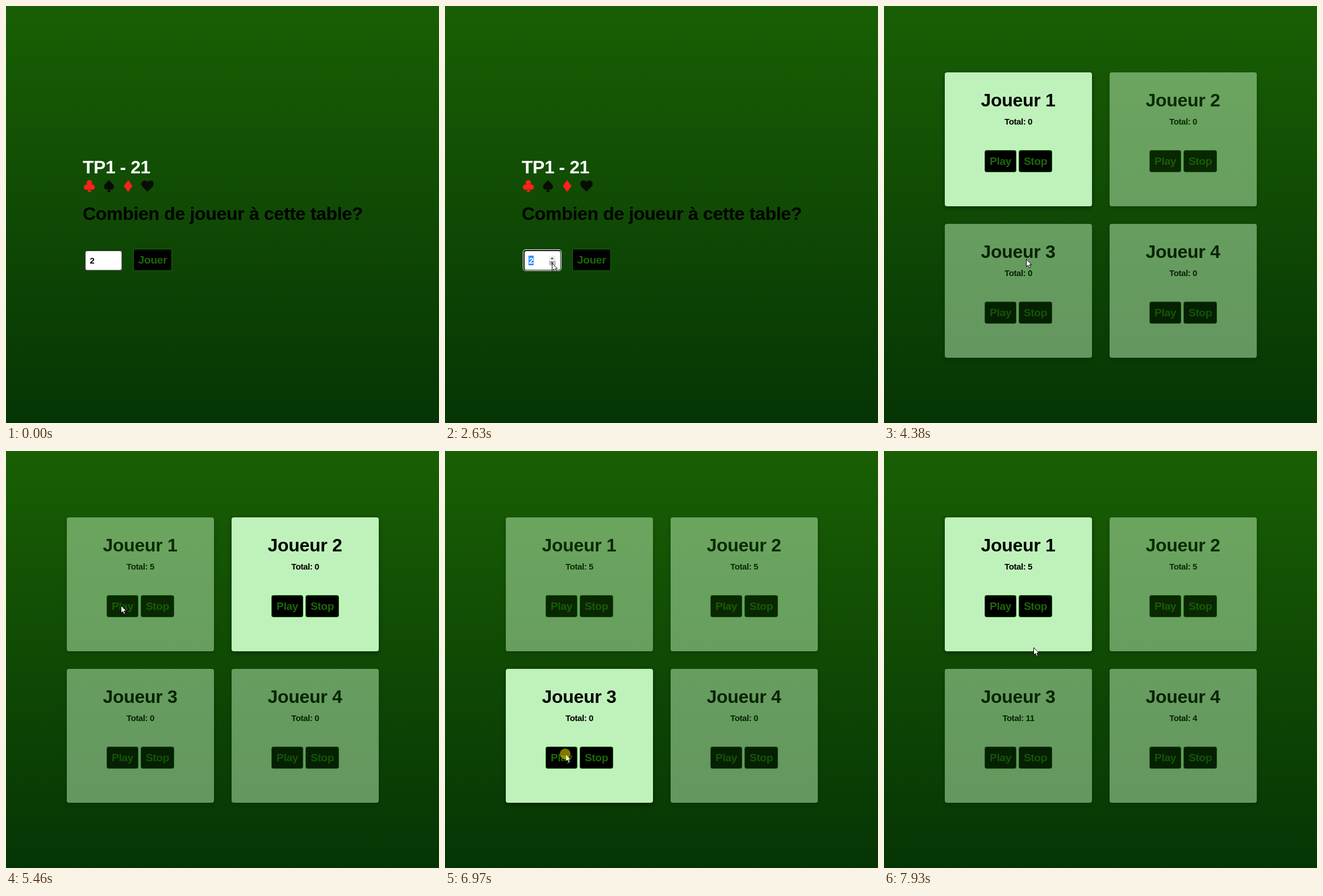
Write an HTML page with a canvas that moves like this. It is 762x735 px and loops after 8 s.

```html
<!DOCTYPE html>
<html lang="fr">
<head>
<meta charset="utf-8">
<title>21</title>
<style>
html, body { margin: 0; width: 100%; height: 100%; overflow: hidden; background: #0f4a04; }
canvas { display: block; }
</style>
</head>
<body>
<canvas id="stage" width="762" height="735"></canvas>
<script>
const W = 762, H = 735, LOOP = 8000, PRESS = 70;
const ctx = document.getElementById('stage').getContext('2d');
const FONT = '"Liberation Sans", Arial, sans-serif';
const HEART = 'M0 10L-9 1C-15 -6 -6 -14 0 -7C6 -14 15 -6 9 1Z';
const STEM = 'M-1 2H1Q1 8 3.600 10.500H-3.600Q-1 8 -1 2Z';
const ARROW = 'M0 0V13L3 10.300L5 15L7.300 14L5.300 9.500H9.300Z';
const HAND = 'M-1.500 1Q0 -1 1.500 1V6L8 7.500V13L6 18H-2L-6 10Q-5 7.500 -1.500 11Z';

const felt = ctx.createLinearGradient(0, 0, 0, H);
felt.addColorStop(0, '#195f04');
felt.addColorStop(1, '#063505');

// The pointer's errands: where it rests, from when, and when it clicks there.
const visit = (x, y, rest, ...clicks) => ({ x, y, rest, clicks });
const entry = visit(476, 640, 100);
const lower = visit(188, 453, 1220, 1490, 1890, 2430);
const raise = visit(188, 442, 2900, 3250, 3640);
const start = visit(250, 446, 4130, 4180);
const plays = [
  visit(201, 272, 5180, 5220),
  visit(495, 281, 6040, 6080),
  visit(212, 534, 6970, 6970),
  visit(480, 529, 7340, 7390)
];
const VISITS = [entry, visit(194, 452, 610), lower, raise, start, ...plays, visit(263, 346, 7930)];
const CLICKS = VISITS.flatMap(v => v.clicks);
const SCORES = [5, 5, 11, 4];
const tableAt = start.clicks[0] + PRESS;

const pressed = t => CLICKS.some(c => t >= c && t < c + PRESS);
const turns = t => plays.filter(p => t >= p.clicks[0] + PRESS).length;
const cardX = i => 107 + 290 * (i % 2);
const cardY = i => 117 + 267 * Math.floor(i / 2);

function pointer(t) {
  let i = VISITS.findIndex(v => v.rest > t);
  if (i < 1) i = i < 0 ? VISITS.length - 1 : 1;
  const a = VISITS[i - 1], b = VISITS[i];
  const travel = 250 + 1.2 * Math.hypot(b.x - a.x, b.y - a.y);
  const go = Math.max((a.clicks.at(-1) ?? a.rest) + 100, b.rest - travel);
  const u = Math.min(1, Math.max(0, (t - go) / (b.rest - go)));
  const e = u * u * (3 - 2 * u);
  return {
    x: Math.round(a.x + (b.x - a.x) * e),
    y: Math.round(a.y + (b.y - a.y) * e),
    settled: u === 0 && t - a.rest > 30
  };
}

function box(x, y, w, h, r, fill) {
  ctx.beginPath();
  ctx.roundRect(x, y, w, h, r);
  ctx.fillStyle = fill;
  ctx.fill();
}

function disc(x, y, r, fill) {
  ctx.beginPath();
  ctx.arc(x, y, r, 0, Math.PI * 2);
  ctx.fillStyle = fill;
  ctx.fill();
}

function shape(d, x, y, fill, stroke, sx = 1, sy = 1) {
  const p = new Path2D(d);
  ctx.save();
  ctx.translate(x, y);
  ctx.scale(sx, sy);
  ctx.fillStyle = fill;
  ctx.fill(p);
  if (stroke) {
    ctx.strokeStyle = stroke;
    ctx.lineJoin = 'round';
    ctx.stroke(p);
  }
  ctx.restore();
}

function text(str, x, y, size, color, align = 'left', spacing = -0.01 * size) {
  ctx.font = `bold ${size}px ${FONT}`;
  ctx.letterSpacing = spacing + 'px';
  ctx.textAlign = align;
  ctx.fillStyle = color;
  ctx.fillText(str, x, y);
}

function button(label, x, y, w) {
  box(x, y, w, 39, 4, '#17640a');
  box(x + 1, y + 1, w - 2, 37, 3, '#000');
  text(label, x + w / 2, y + 26, 19.2, '#1b690a', 'center', -0.35);
}

function suits() {
  const red = '#fb221c', black = '#080d05', y = 317.3;
  for (let k = 0; k < 3; k++) {
    const a = (k * 2 / 3 - 0.5) * Math.PI;
    disc(146.7 + 5.7 * Math.cos(a), y - 0.5 + 5.2 * Math.sin(a), 4.8, red);
  }
  disc(146.7, y, 3, red);
  shape(STEM, 146.7, y, red);
  shape(HEART, 181.2, y - 2, black, null, 0.8, -0.85);
  shape(STEM, 181.2, y, black);
  shape('M0 -10.500L7.600 0L0 10.500L-7.600 0Z', 215, y, red);
  shape(HEART, 249, y, black);
}

function spinner(t, y) {
  const hover = y < 449 ? 0 : t >= lower.rest - 200 ? 1 : -1;
  for (let half = 0; half < 2; half++) {
    const lit = pressed(t) ? '#999' : '#c4c4c4';
    box(183, 440 + 9 * half, 12, 9 - half, 0, half === hover ? lit : '#f0f0f0');
    shape('M-3 1.500L0 -1.500L3 1.500Z', 188.5, 444.5 + 8.5 * half, '#444', null, 1, 1 - 2 * half);
  }
}

function field(t, y) {
  const focus = t >= lower.clicks[0], selected = focus && t < raise.clicks[0];
  if (focus) {
    box(137, 429, 68, 38, 5, '#fff');
    box(138, 430, 66, 36, 4, '#101010');
  } else {
    box(139, 431, 65, 35, 3, '#777');
    box(139, 431, 64, 34, 3, '#26331f');
  }
  box(140, 432, 63, 33, 3, '#fff');
  if (selected) box(147, 440, 9, 17, 0, '#3390ff');
  const value = 2 + raise.clicks.filter(c => t >= c).length;
  text(value, 147.5, 454, 15, selected ? '#fff' : '#000', 'left', 0);
  if (focus && !selected) box(155, 440, 1, 16, 0, '#000');
  if (t >= 560 && t < start.rest - 150) spinner(t, y);
}

function welcome(t, y) {
  text('TP1 - 21', 135, 295, 32, '#fff', 'left', -0.5);
  suits();
  text('Combien de joueur à cette table?', 135, 377, 32, '#000');
  field(t, y);
  button('Jouer', 224, 428, 68);
}

function card(i, active, score) {
  const x = cardX(i), y = cardY(i), w = 259, h = 236, mid = x + w / 2;
  ctx.save();
  ctx.shadowColor = 'rgba(0,0,0,.4)';
  ctx.shadowBlur = 10;
  ctx.shadowOffsetY = 3;
  box(x, y, w, h, 4, '#bff2ba');
  ctx.restore();
  text('Joueur ' + (i + 1), mid - 0.5, y + 60, 32, '#000', 'center');
  text('Total: ' + score, mid, y + 92, 15, '#000', 'center', -0.4);
  button('Play', x + 70, y + 137, 56);
  button('Stop', x + 130, y + 137, 59);
  if (!active) {
    // letting the felt through at half strength fades the whole card
    ctx.globalAlpha = 0.5;
    box(x - 15, y - 15, w + 30, h + 30, 0, felt);
    ctx.globalAlpha = 1;
  }
}

function table(t) {
  const played = turns(t);
  SCORES.forEach((score, i) => card(i, i === played % 4, i < played ? score : 0));
}

function overButton(t, x, y) {
  const i = turns(t) % 4;
  const [left, top, w] = t < tableAt ? [224, 428, 68] : [cardX(i) + 70, cardY(i) + 137, 119];
  return x >= left && x < left + w && y >= top && y < top + 39;
}

function cursor(t, { x, y, settled }) {
  const hand = settled && overButton(t, x, y);
  shape(hand ? HAND : ARROW, x + 0.5, y + 0.5, '#fff', '#000');
  if (pressed(t)) disc(x - 0.5, y, 9.5, 'rgba(255,240,0,.5)');
}

function draw(t) {
  const p = pointer(t);
  box(0, 0, W, H, 0, felt);
  if (t < tableAt) welcome(t, p.y);
  else table(t);
  if (t >= 200) cursor(t, p);
}

function tick() {
  draw(performance.now() % LOOP);
  requestAnimationFrame(tick);
}
tick();
</script>
</body>
</html>
```
